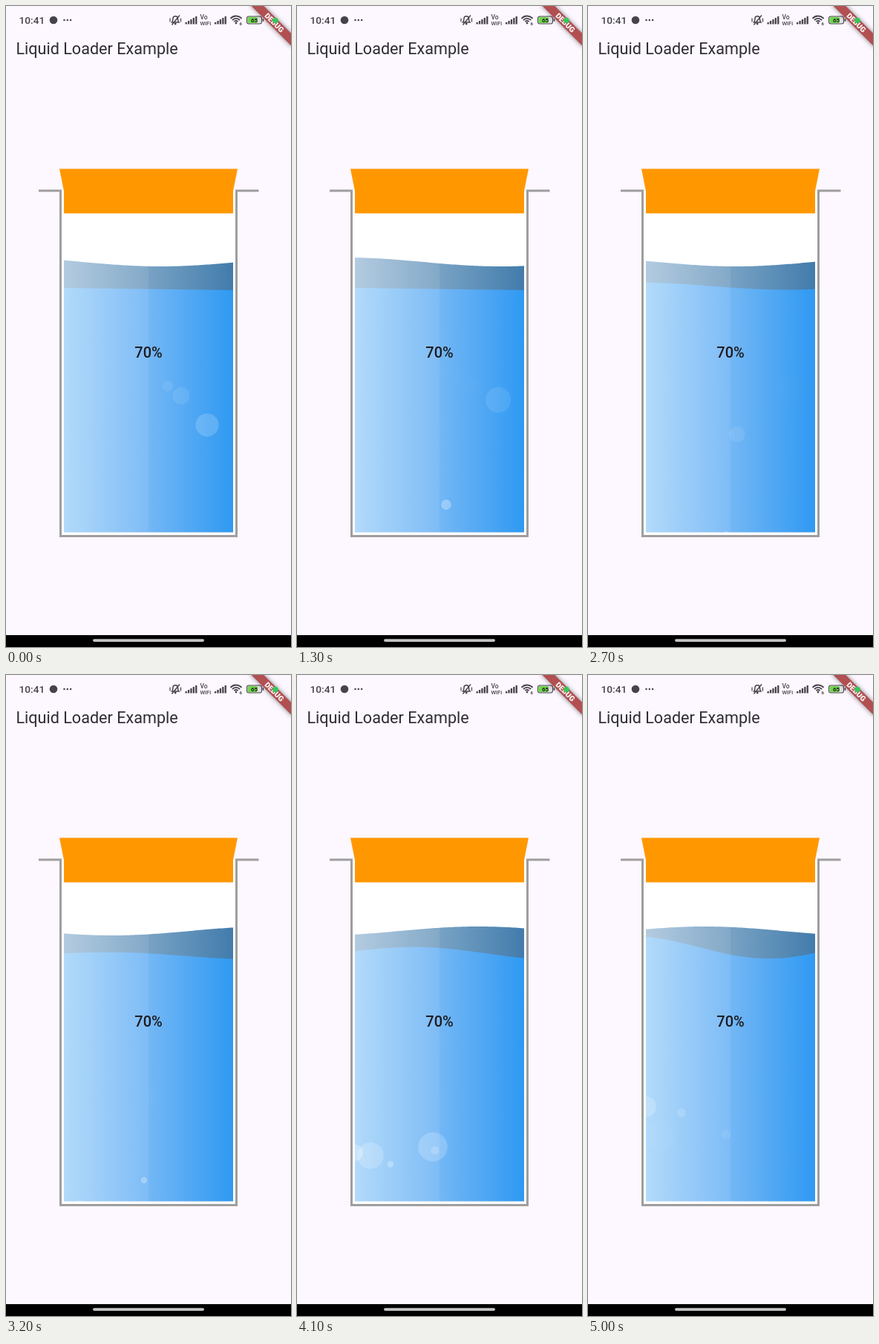
Recreate the animation shown at these times as an HTML page with a canvas. Size 384 by 864 pixels, loop 5100 ms.

```html
<!DOCTYPE html>
<html lang="en">
<head>
<meta charset="utf-8">
<title>Liquid loader</title>
<style>
html, body { margin: 0; width: 100%; height: 100%; overflow: hidden; background: #fdf7ff; }
canvas { display: block; width: 384px; height: 864px; }
</style>
</head>
<body>
<canvas id="stage" width="384" height="864"></canvas>
<script>
const ctx = document.getElementById('stage').getContext('2d');
const LOOP = 5100, STEP = 100, TAU = 2 * Math.PI;
const TANK = { left: 78, right: 306, top: 279, bottom: 709.5 };
const BUBBLE_START = 718;
const PAPER = '#fdf7ff', INK = '#47434a';

// Each bubble leaves the tank floor and eases out at its top height.
const bubbles = [
  { x: 218, top: 500, size: 7.6, end: 1.4, life: 5.9 },
  { x: 236, top: 512, size: 12, end: 1.5, life: 5.9 },
  { x: 271, top: 516, size: 18, end: 2.9, life: 5.9 },
  { x: 201, top: 568, size: 11, end: 3.3, life: 2.4 },
  { x: 186, top: 615, size: 6.5, end: 5.6, life: 3 },
  { x: 183, top: 598, size: 24, end: 5, life: 1.6 },
  { x: 99, top: 621, size: 21, end: 5.1, life: 1.9 },
  { x: 78, top: 526, size: 16.5, end: 7, life: 3.7 },
  { x: 126, top: 567, size: 6.5, end: 5.9, life: 2.3 }
];

function gradient(...stops) {
  const g = ctx.createLinearGradient(TANK.left, 0, TANK.right, 0);
  for (const [at, color] of stops) g.addColorStop(at, color);
  return g;
}
const frontFill = gradient([0, '#b2dafa'], [0.498, '#7ebcf6'], [0.502, '#73b7f5'], [1, '#2f99f2']);
const backFill = gradient([0, '#b3cbe0'], [0.498, '#83a9c8'], [0.502, '#78a2c4'], [1, '#427cac']);

function poly(points, color) {
  ctx.beginPath();
  for (const [x, y] of points) ctx.lineTo(x, y);
  ctx.fillStyle = color;
  ctx.fill();
}

function line(points, color, width) {
  ctx.beginPath();
  for (const [x, y] of points) ctx.lineTo(x, y);
  ctx.strokeStyle = color;
  ctx.lineWidth = width;
  ctx.stroke();
}

function disc(x, y, r, color) {
  ctx.beginPath();
  ctx.arc(x, y, r, 0, TAU);
  ctx.fillStyle = color;
  ctx.fill();
}

function pill(x, y, w, h, r, color) {
  ctx.beginPath();
  ctx.roundRect(x, y, w, h, r);
  ctx.fillStyle = color;
  ctx.fill();
}

function text(value, x, y, font, color, align = 'left') {
  ctx.font = font + ' Roboto, sans-serif';
  ctx.fillStyle = color;
  ctx.textAlign = align;
  ctx.fillText(value, x, y);
}

// A long sine whose trough swings from side to side.
function backWave(t) {
  const trough = 95 + 180 * Math.cos(0.685 * (t - 1.3));
  return x => 345 + 6 * Math.cos(TAU * (x - trough) / 420);
}

// Calm at first, then a swelling crest that sways left and right.
function frontWave(t) {
  const beat = TAU * (t - 3.7) / 1.3;
  const calm = Math.min(1, Math.max(0, (t - 2.1) / 1.6));
  const swell = calm * (18 + 10 * Math.cos(beat));
  const crest = 126 + 66 * Math.cos(beat / 2);
  return x => 380 + 3 * (x - TANK.left) / 228
    - swell * (1 + Math.cos(TAU * (x - crest) / 360)) / 2;
}

function drawWave(height, fill) {
  const points = [[TANK.right, TANK.bottom], [TANK.left, TANK.bottom]];
  for (let x = TANK.left; x <= TANK.right; x += 3) points.push([x, height(x)]);
  poly(points, fill);
}

function drawBubbles(t) {
  for (const { x, top, size, end, life } of bubbles) {
    const left = (end - t) / life;
    if (left <= 0 || left > 1) continue;
    const fall = left * left;
    ctx.globalAlpha = 0.35 * left;
    disc(x, top + (BUBBLE_START - top) * fall, size * (1 - 0.55 * fall), '#fff');
  }
  ctx.globalAlpha = 1;
}

function drawTank(t) {
  ctx.fillStyle = '#fff';
  ctx.fillRect(75, 249, 234, 464);
  line([[44, 249], [73.5, 249], [73.5, 714.5], [310.5, 714.5], [310.5, 249], [340.5, 249]], '#9e9e9e', 3);
  poly([[72, 219.5], [312, 219.5], [306, 249.5], [306, 279.4], [78, 279.4], [78, 249.5]], '#ff9800');
  ctx.save();
  ctx.beginPath();
  ctx.rect(TANK.left, TANK.top, TANK.right - TANK.left, TANK.bottom - TANK.top);
  ctx.clip();
  drawWave(backWave(t), backFill);
  drawWave(frontWave(t), frontFill);
  drawBubbles(t);
  ctx.restore();
  text('70%', 192, 473.5, '500 20px', '#1d1b20', 'center');
}

function drawSignal(x) {
  ctx.fillStyle = INK;
  for (let i = 0; i < 5; i++) {
    const h = 2.5 + i * 2;
    ctx.fillRect(x + i * 3.4, 24.5 - h, 2.3, h);
  }
}

function drawBell() {
  ctx.beginPath();
  ctx.moveTo(223.5, 22);
  ctx.quadraticCurveTo(225, 20, 225, 17);
  ctx.arc(228.2, 17, 3.2, Math.PI, 0);
  ctx.quadraticCurveTo(231.4, 20, 233, 22);
  ctx.closePath();
  ctx.strokeStyle = INK;
  ctx.lineWidth = 1.5;
  ctx.stroke();
  disc(228.2, 24, 1.4, INK);
  line([[223.5, 25.5], [234, 12.5]], INK, 1.5);
  for (const x of [221, 235.5]) line([[x, 16.5], [x, 21.5]], INK, 1.2);
}

function drawWifi() {
  ctx.strokeStyle = INK;
  ctx.lineWidth = 1.8;
  for (const r of [3.5, 6.7, 10]) {
    ctx.beginPath();
    ctx.arc(310, 23.5, r, -Math.PI * 0.77, -Math.PI * 0.23);
    ctx.stroke();
  }
  disc(310, 23, 1.4, INK);
  text('6', 314.5, 25.5, '700 6px', INK);
}

function drawRibbon() {
  ctx.save();
  ctx.translate(384, 0);
  ctx.rotate(Math.PI / 4);
  ctx.shadowColor = 'rgba(0,0,0,.5)';
  ctx.shadowBlur = 6;
  ctx.fillStyle = '#b14f51';
  ctx.fillRect(-40, 26, 80, 11.7);
  ctx.shadowBlur = 0;
  text('DEBUG', 0, 35.4, '900 10px', '#fff', 'center');
  ctx.restore();
}

function drawStatusBar() {
  text('10:41', 17.5, 24, '500 13.7px', INK);
  disc(64, 19, 5.3, INK);
  for (let i = 0; i < 3; i++) disc(78.5 + 4.3 * i, 19, 1.25, INK);
  drawBell();
  drawSignal(241.5);
  text('Vo', 261.5, 18, '500 8.5px', INK);
  text('WiFi', 261.5, 25.5, '500 7.5px', INK);
  drawSignal(281);
  drawWifi();
  pill(324, 13.5, 21, 11, 3.2, INK);
  pill(325, 14.5, 19, 9, 2.3, '#e6e1e8');
  pill(325.5, 15, 13.5, 8, 2, '#6fd64a');
  pill(345.6, 17, 1.6, 4, 0.8, INK);
  text('65', 334.5, 22, '700 8px', '#222', 'center');
  drawRibbon();
  disc(363, 19.5, 3.8, '#35c759');
}

function drawTouch(t) {
  if (t < 4.35 || t > 4.75) return;
  disc(305, 667, 9.3, 'rgba(205,228,250,.8)');
  ctx.strokeStyle = 'rgba(120,175,225,.6)';
  ctx.lineWidth = 0.8;
  ctx.stroke();
}

function draw(t) {
  ctx.fillStyle = PAPER;
  ctx.fillRect(0, 0, 384, 864);
  drawStatusBar();
  text('Liquid Loader Example', 13.4, 65, '400 21.6px', '#2f2c33');
  drawTank(t);
  drawTouch(t);
  ctx.fillStyle = '#000';
  ctx.fillRect(0, 848, 384, 16);
  pill(117, 853.3, 150, 3.6, 1.8, '#c4c4c4');
}

const start = performance.now();
function tick() {
  const ms = (performance.now() - start) % LOOP;
  draw(Math.floor(ms / STEP) * STEP / 1000);
  requestAnimationFrame(tick);
}
tick();
</script>
</body>
</html>
```
